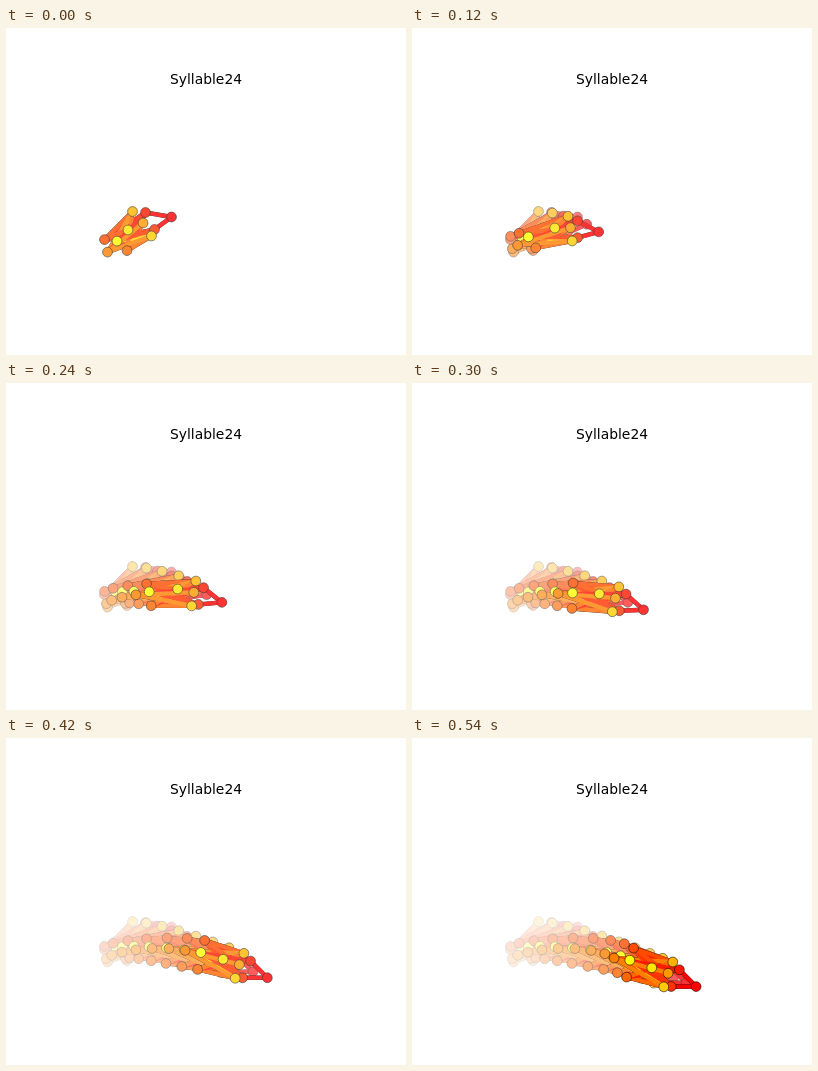
Recreate the animation shown at these times as an HTML page with a canvas. Size 400x327 px, loop 0.6 s.

```html
<!DOCTYPE html>
<html lang="en">
<head>
<meta charset="utf-8">
<title>Syllable24</title>
<style>
  html, body { margin: 0; width: 100%; height: 100%; overflow: hidden; background: #fff; }
  canvas { display: block; width: 400px; height: 327px; }
</style>
</head>
<body>
<canvas id="stage" width="400" height="327"></canvas>
<script>
const WIDTH = 400, HEIGHT = 327;
const STEP_MS = 60, STEPS = 10;
const PT = 100 / 72;
const ctx = document.getElementById('stage').getContext('2d');

const mix = (a, b, u) => a + (b - a) * u;
const mixPoint = (p, q, u) => [mix(p[0], q[0], u), mix(p[1], q[1], u)];
const easeOut = u => 1 - (1 - u) ** 3;
const smooth = u => u * u * (3 - 2 * u);

function bezier(points, u) {
  while (points.length > 1)
    points = points.slice(1).map((p, i) => mixPoint(points[i], p, u));
  return points[0];
}

// Front and rear each follow a curve while turning to a new heading.
const front = {
  path: [[140, 194.4], [164, 199.6], [234, 229], [259.8, 238.3]],
  turn: easeOut
};
const rear = {
  path: [[108, 217.8], [93.3, 208], [194.5, 208.5], [214.1, 223.1]],
  turn: u => smooth(Math.min(1, u * 9 / 7))
};

// Offsets from the group's centre before and after the turn.
const keypoints = [
  { name: 'nose',           group: front, from: [25.5, -5.4],   to: [24.3, 10.3] },
  { name: 'left ear',       group: front, from: [-0.5, -9.9],   to: [7.6, -6.5] },
  { name: 'right ear',      group: front, from: [8.5, 7.1],     to: [-0.6, 10.2] },
  { name: 'left hip',       group: rear,  from: [-9.5, -6.2],   to: [7.5, -13] },
  { name: 'right hip',      group: rear,  from: [13, 4.8],      to: [0.5, 16] },
  { name: 'tail',           group: rear,  from: [-6.5, 6.3],    to: [-12, -3] },
  { name: 'neck',           group: front, from: [-3, 0.6],      to: [-3.7, -3] },
  { name: 'left shoulder',  group: front, from: [-13.5, -10.9], to: [1, -14.3] },
  { name: 'right shoulder', group: front, from: [5.5, 13.6],    to: [-8, 10.6] },
  { name: 'upper spine',    group: front, from: [-18, 7.6],     to: [-20, -8.5] },
  { name: 'lower spine',    group: rear,  from: [3, -4.7],      to: [3.7, -0.9] }
];
const count = keypoints.length;
const colors = keypoints.map((_, i) => `rgb(255,${Math.floor(255 * i / (count - 1))},0)`);

// The nose joins the ears; every other front point joins every rear point.
const edges = [];
for (let a = 0; a < count; a++)
  for (let b = a + 1; b < count; b++)
    if (a === 0 ? b < 3 : keypoints[a].group !== keypoints[b].group) edges.push([a, b]);
const layer = ([a, b]) => (a * 7 + b * 5) % count;
edges.sort((e, f) => layer(e) - layer(f));

function poseAt(u) {
  return keypoints.map(({ group, from, to }) => {
    const [cx, cy] = bezier(group.path, u);
    const [dx, dy] = mixPoint(from, to, group.turn(u));
    return [cx + dx, cy + dy];
  });
}

function drawEdges(pose, width, colorOf) {
  ctx.lineWidth = width;
  for (const [a, b] of edges) {
    ctx.strokeStyle = colorOf(a);
    ctx.beginPath();
    ctx.moveTo(...pose[a]);
    ctx.lineTo(...pose[b]);
    ctx.stroke();
  }
}

function drawPose(pose) {
  drawEdges(pose, 3.2 * PT, () => '#000');
  drawEdges(pose, 3 * PT, a => colors[a]);
  ctx.lineWidth = 0.4 * PT;
  ctx.strokeStyle = '#000';
  pose.forEach(([x, y], i) => {
    ctx.fillStyle = colors[i];
    ctx.beginPath();
    ctx.arc(x, y, Math.sqrt(50) / 2 * PT, 0, 2 * Math.PI);
    ctx.fill();
    ctx.stroke();
  });
}

function drawScene(step) {
  ctx.fillStyle = '#fff';
  ctx.fillRect(0, 0, WIDTH, HEIGHT);
  for (let i = 0; i <= step; i++) {
    drawPose(poseAt(i / (STEPS - 1)));
    // A white veil fades every pose except the last.
    if (i < STEPS - 1) {
      ctx.fillStyle = 'rgba(255,255,255,0.2)';
      ctx.fillRect(0, 0, WIDTH, HEIGHT);
    }
  }
  ctx.fillStyle = '#000';
  ctx.font = `${10 * PT}px "DejaVu Sans", sans-serif`;
  ctx.textAlign = 'center';
  ctx.fillText('Syllable24', 200, 56);
}

let start, shown = -1;
function frame(now) {
  start ??= now;
  const step = Math.floor((now - start) / STEP_MS) % STEPS;
  if (step !== shown) drawScene(shown = step);
  requestAnimationFrame(frame);
}
drawScene(0);
requestAnimationFrame(frame);
</script>
</body>
</html>
```
